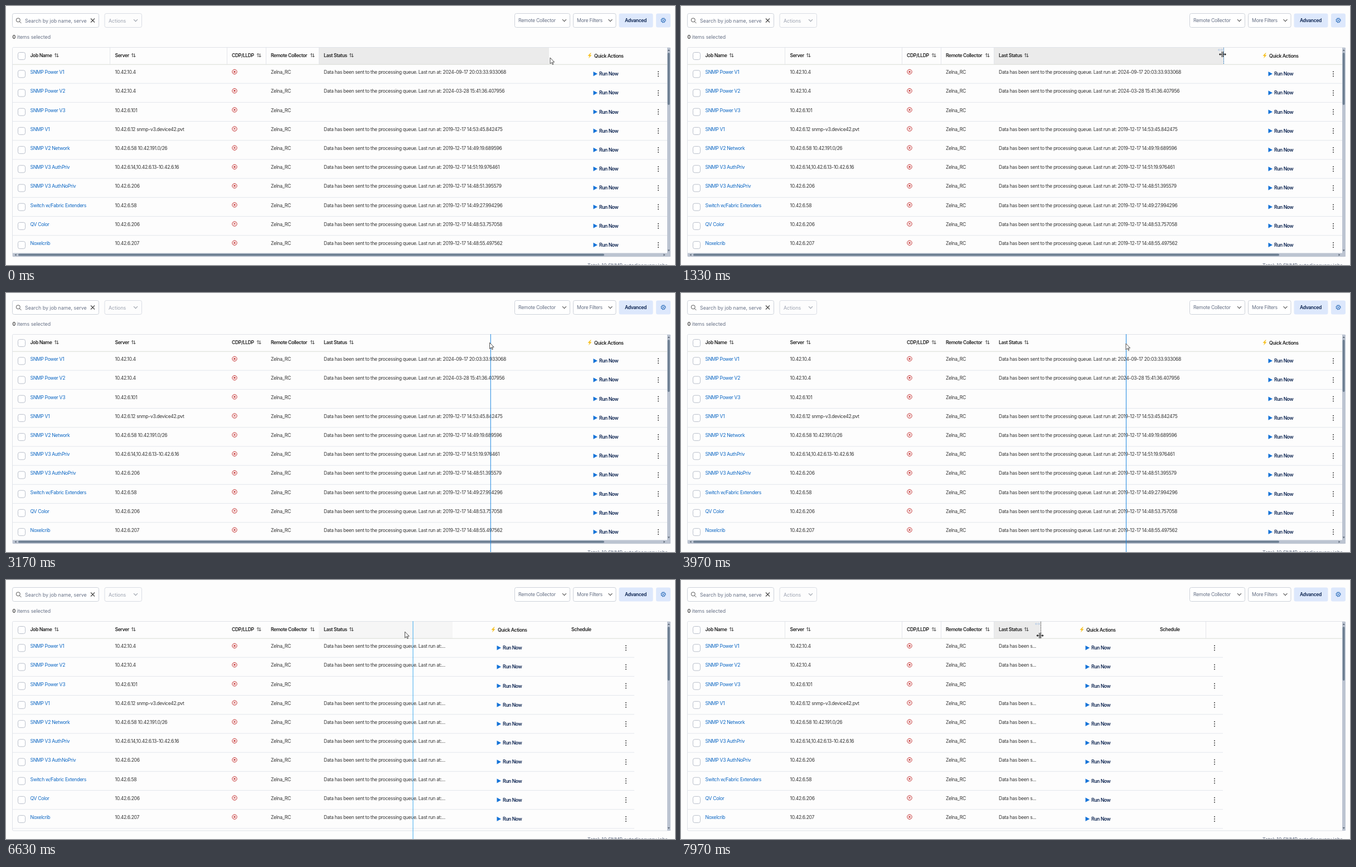
Animation of 1200 by 466 pixels, one loop 8 s. Source, as an HTML page:

```html
<!DOCTYPE html>
<html lang="en">
<head>
<meta charset="utf-8">
<title>Resizing a table column</title>
<style>
html, body { margin: 0; width: 100%; height: 100%; overflow: hidden; background: #fdfdfd; }
svg { display: block; }
text { font: 8.6px Inter, sans-serif; letter-spacing: -.32px; fill: #333; white-space: pre; }
.ui { font-size: 8.8px; letter-spacing: 0; fill: #667085; }
.tight { letter-spacing: -.3px; }
.head { font-weight: 600; letter-spacing: -.4px; fill: #222; }
.run { fill: #0b2350; }
.link { fill: #0b66c3; }
.line { fill: none; stroke-width: 1; }
</style>
</head>
<body>
<svg width="1200" height="466" viewBox="0 0 1200 466">
  <defs><clipPath id="view"><rect x="12" y="74" width="1174" height="376"/></clipPath></defs>
  <g id="toolbar"></g>
  <rect id="hover" x="561" y="75" height="30" fill="#ebebeb"/>
  <g id="table" clip-path="url(#view)"></g>
  <g id="frame"></g>
  <g id="handle">
    <path id="edge" class="line" d="M0 75V105" stroke-dasharray="2 1"/>
    <path class="line" d="M-10 79H-2M-8 77L-10 79L-8 81M-4 77L-2 79L-4 81" stroke="#a9c3e2" style="stroke-width:.8"/>
  </g>
  <path id="guide" class="line" d="M0 74V466"/>
  <path id="arrow" d="M0 0V11L2.6 8.6L4.3 12.3L5.9 11.6L4.2 8H7.6Z" fill="#fff" stroke="#222" stroke-width=".8"/>
  <g id="resize">
    <path class="line" d="M-1.2 -5V5M1.2 -5V5M-5 0H-1M1 0H5" stroke="#111"/>
    <path d="M-6.5 0L-4 -2.3V2.3ZM6.5 0L4 -2.3V2.3Z" fill="#111"/>
  </g>
</svg>
<script>
const $ = id => document.getElementById(id);
const text = (x, y, s, cls = '') => `<text x="${x}" y="${y}" class="${cls}">${s}</text>`;
const line = (d, color, w = 1) =>
  `<path d="${d}" class="line" stroke="${color}" style="stroke-width:${w}"/>`;
const solid = (d, color) => `<path d="${d}" fill="${color}"/>`;
const box = (x, y, w, h, fill, stroke = 'none', r = 3) =>
  `<rect x="${x}" y="${y}" width="${w}" height="${h}" rx="${r}" fill="${fill}" stroke="${stroke}"/>`;
const chevron = (x, color) => line(`M${x - 3.5} 24.2l3.5 3.5l3.5 -3.5`, color, 1.1);
const check = y => box(21.5, y - 6.5, 13, 13, '#fff', '#b9bfca');
const sortIcon = x => line(`M${x + 2} 92V85.5m-2 2l2 -2l2 2M${x + 5.5} 85.5V92m-2 -2l2 2l2 -2`, '#333', .9);

const ROW = 34.2, GRID = '#e3e6ec';
const queued = 'Data has been sent to the processing queue. Last run at: ';
const rows = [
  ['SNMP Power V1', '10.42.10.4', '2024-09-17 20:03:33.933068'],
  ['SNMP Power V2', '10.42.10.4', '2024-03-28 15:41:36.407956'],
  ['SNMP Power V3', '10.42.6.101', ''],
  ['SNMP V1', '10.42.6.12 snmp-v3.device42.pvt', '2019-12-17 14:53:45.842475'],
  ['SNMP V2 Network', '10.42.6.58 10.42.191.0/26', '2019-12-17 14:49:19.689596'],
  ['SNMP V3 AuthPriv', '10.42.6.14,10.42.6.13-10.42.6.16', '2019-12-17 14:51:19.976461'],
  ['SNMP V3 AuthNoPriv', '10.42.6.206', '2019-12-17 14:48:51.395579'],
  ['Switch w/Fabric Extenders', '10.42.6.58', '2019-12-17 14:49:27.994296'],
  ['QV Color', '10.42.6.206', '2019-12-17 14:48:53.757058'],
  ['Noxelcrib', '10.42.6.207', '2019-12-17 14:48:55.497562']
];
const heads = [
  [43.5, 'Job Name', 87], [195.5, 'Server', 225], [405, 'CDP/LLDP', 450],
  [475, 'Remote Collector', 546], [570, 'Last Status', 616]
];

$('toolbar').innerHTML =
  box(11.5, 13.5, 155, 25, '#fff', '#cdd2da') +
  '<circle cx="21.8" cy="25.3" r="3.5" class="line" stroke="#555"/>' + line('M24.4 28l3 3', '#555') +
  text(34, 29.5, 'Search by job name, serve', 'ui') +
  line('M152 22.5l7 7m0 -7l-7 7', '#444', 1.1) +
  box(177, 13.5, 66.5, 25, '#fdfdfd', '#d9dde4') +
  `<g opacity=".65">${text(184, 29.5, 'Actions', 'ui')}</g>` + chevron(232.5, '#999fa9') +
  box(912.5, 13.5, 99, 25, '#fff', '#cdd2da') + text(919, 29.3, 'Remote Collector', 'ui tight') + chevron(1001.5, '#555') +
  box(1017.5, 13.5, 76.5, 25, '#fff', '#cdd2da') + text(1024, 29.3, 'More Filters', 'ui tight') + chevron(1084, '#555') +
  box(1099.5, 13.5, 61, 25, '#dde8fc') + text(1110, 29, 'Advanced', 'head run') +
  box(1166, 13.5, 26, 25, '#dde8fc') +
  '<circle cx="1179" cy="25.8" r="3.2" class="line" stroke="#1b62b5"/>' +
  '<circle cx="1179" cy="25.8" r="4.2" class="line" stroke="#1b62b5" stroke-dasharray="1.65 1.65"/>' +
  '<circle cx="1179" cy="25.8" r="1.1" fill="#1b62b5"/>' +
  '<text x="11.5" y="58.8" class="ui"><tspan font-weight="600" fill="#333">0</tspan> items selected</text>' +
  '<text x="1187" y="470" class="ui" text-anchor="end">Total: 10 SNMP autodiscovery jobs</text>';

// shift: how far the status column has been narrowed
function drawTable(shift) {
  const end = Math.min(1186, 1300 - shift), menu = Math.min(1170, 1285 - shift);
  const cut = shift > 200 ? 15 : shift ? 56 : 0;
  const q = 1055 - shift;
  let s = line('M12 105.2H1186', '#d9dcd6') + check(90);
  for (const [x, name, icon] of heads) s += text(x, 92, name, 'head') + sortIcon(icon);
  s += solid(`M${q - 6.5} 84.5l-5 5.3h3.2l-1.8 4.4l5.6 -5.9h-3.3l2.6 -3.8z`, '#f6bd16') +
    text(q, 92.6, 'Quick Actions', 'head') + text(1187 - shift, 92, 'Schedule', 'head');
  s += `<g id="seps">${[186.5, 396.5, 466.5, 561.5, 1269.5 - shift]
    .map(x => line(`M${x} 75V105`, '#e4e6ea')).join('')}</g>`;
  rows.forEach(([name, server, run], i) => {
    const status = run && (cut ? (queued + run).slice(0, cut) + '...' : queued + run);
    s += `<g transform="translate(0 ${i * ROW})">` + check(122.3) +
      text(43.5, 122.3, name, 'link') + text(195.5, 122.3, server) +
      '<circle cx="410" cy="118.4" r="4.2" class="line" stroke="#c53030"/>' +
      line('M408.4 116.8l3.2 3.2m0 -3.2l-3.2 3.2', '#c53030', 1.1) +
      text(475, 122.3, 'Zelna_RC') + text(570, 122.3, status) +
      solid(`M${q - 1.5} 118l7.5 4.1l-7.5 4.1z`, '#1473d8') + text(q + 9, 125.2, 'Run Now', 'head run') +
      [-4, 0, 4].map(d => `<circle cx="${menu}" cy="${122.2 + d}" r="1" fill="#333"/>`).join('') +
      line(`M12 139.2H${end}`, GRID) + '</g>';
  });
  $('table').innerHTML = s;

  const bottom = shift ? 451 : 444.5;
  let f = box(11.5, 74.5, 1180, 376.5, 'none', '#dfe2e8', 2) +
    box(1186, 75, 6, 376, '#bcc4d1', 'none', 0) +
    box(1186.8, 84, 3.8, shift ? 97 : 94, '#6d7f92', 'none', 2) +
    solid(`M1186.8 81l2 -3l2 3zM1186.8 ${bottom - 6}l2 3l2 -3z`, '#5f6b7a');
  if (!shift) f += box(12, 444.5, 1180, 6.5, '#bcc4d1', 'none', 0) +
    box(22, 445.8, 1051, 3.8, '#6d7f92', 'none', 2) +
    solid('M18.5 445.7l-3 2l3 2zM1179.5 445.7l3 2l-3 2z', '#5f6b7a');
  $('frame').innerHTML = f;
}

const ease = p => p * p * (3 - 2 * p);
const clamp = p => Math.max(0, Math.min(1, p));
// eased value along [time, value] keys
function track(keys, t) {
  let v = keys[0][1];
  for (let i = 1; i < keys.length; i++) {
    const [t0, a] = keys[i - 1], [t1, b] = keys[i];
    if (t >= t0) v = a + (b - a) * ease(clamp((t - t0) / (t1 - t0)));
  }
  return v;
}
const mouseX = [[450, 976], [950, 971.5], [2050, 971.5], [2300, 967], [2500, 967], [3700, 798], [6430, 798], [6814, 644]];
const mouseY = [[450, 93], [950, 87], [2500, 87], [3700, 91], [6430, 91], [6814, 95], [7500, 100]];
const guideX = [[2500, 970.5], [3700, 798.5], [6450, 798.5], [6841, 644.5]];
const drags = [[2050, 4100], [6450, 7650]];
const show = (id, on) => $(id).style.display = on ? '' : 'none';
const move = (id, x, y) => $(id).setAttribute('transform', `translate(${x} ${y})`);

let shown = -1;
function draw(now) {
  const t = now % 8000;
  const shift = t < 4100 ? 0 : t < 7650 ? 173 : 328;
  if (shift !== shown) drawTable(shown = shift);
  const drag = drags.some(([a, b]) => t >= a && t < b);
  const onEdge = !drag && t > 700;
  const x = track(mouseX, t), y = track(mouseY, t);

  show('seps', !drag);
  $('hover').setAttribute('width', 413 - shift);
  $('hover').style.opacity = drags.reduce(
    (o, [a, b]) => o - clamp((t - a) / 300) + clamp((t - b) / 300), 1);
  show('handle', onEdge);
  move('handle', 973.5 - shift, 0);
  $('edge').setAttribute('stroke', shift ? '#555' : '#3c86c8');
  show('guide', drag);
  move('guide', track(guideX, t), 0);
  $('guide').setAttribute('stroke', t < 2600 ? '#555b63' : t < 5000 ? '#1e88e0' : '#3fabee');
  show('arrow', !onEdge);
  move('arrow', x, y);
  show('resize', onEdge);
  move('resize', x, y);
}
const start = performance.now();
function tick() {
  draw(performance.now() - start);
  requestAnimationFrame(tick);
}
tick();
</script>
</body>
</html>
```
